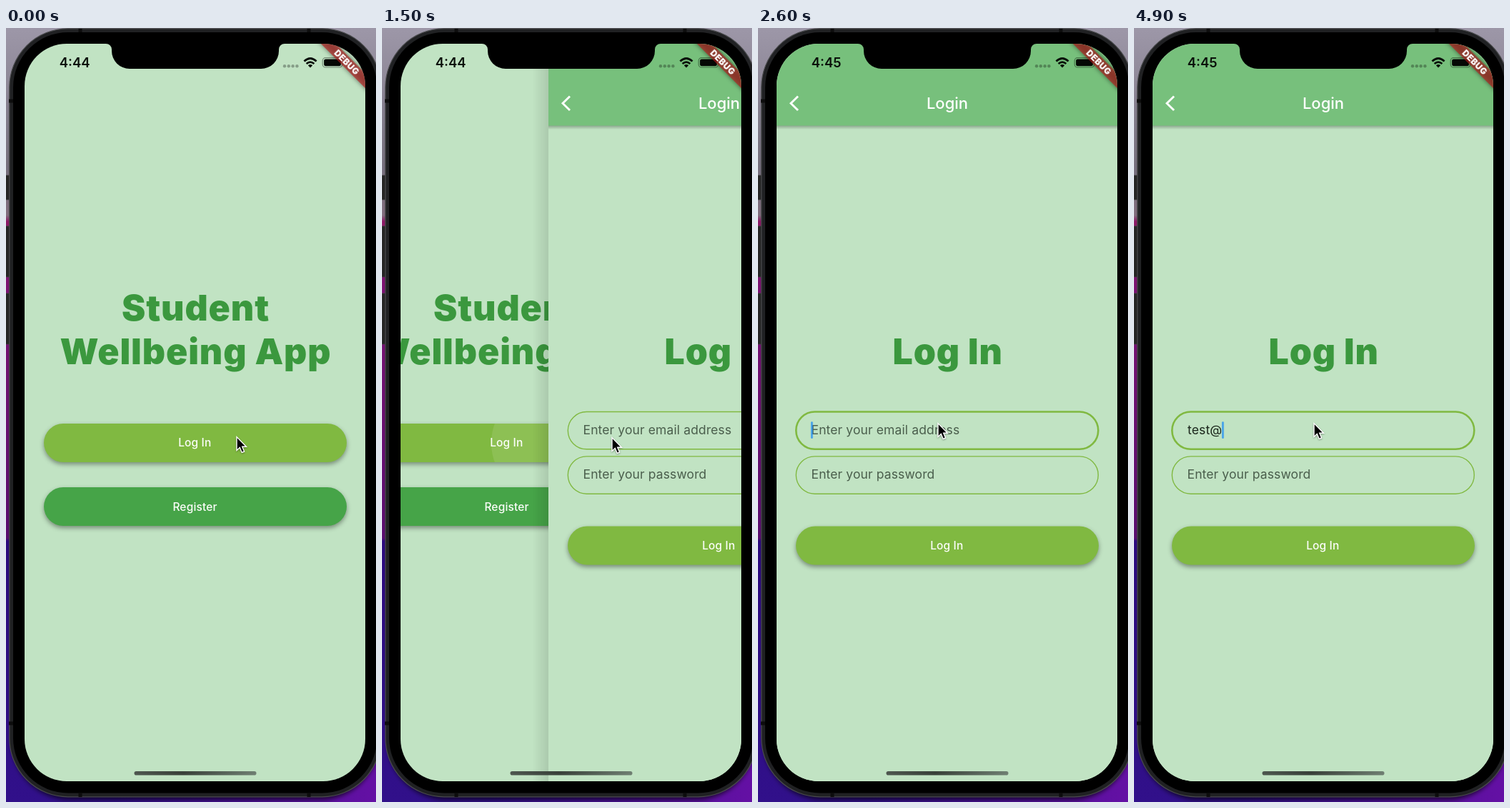
Write an HTML page that moves like this. It is 518 px wide and 1082 px high and loops after 5000 ms.

```html
<!DOCTYPE html>
<html lang="en">
<head>
<meta charset="utf-8">
<title>Login walkthrough</title>
<style>
html, body { margin: 0; height: 100%; overflow: hidden; background: #000; }
svg { display: block; width: 100vw; height: 100vh; }
text { font-family: Inter, "Open Sans", sans-serif; font-optical-sizing: none; }
.title { font-size: 50px; font-weight: 900; letter-spacing: .9px; fill: #3b983e; text-anchor: middle; }
.label { font-size: 15.5px; font-weight: 500; letter-spacing: .15px; fill: #fbfdf9; text-anchor: middle; }
.bar-title { font-size: 22px; font-weight: 500; fill: #fff; text-anchor: middle; }
.input { font-size: 17.5px; letter-spacing: .12px; fill: #1c281d; }
.hint { fill: #4a5e4c; }
.clock { font-size: 18.5px; font-weight: 600; fill: #0a100a; }
.debug { font-size: 12px; font-weight: 900; letter-spacing: .4px; fill: #fff; text-anchor: middle; }
.pill { filter: drop-shadow(0 3px 3px rgba(0, 0, 0, .38)); }
.field { fill: none; stroke: #80b941; stroke-width: 1.4; }

/* 2% of the loop is one 100 ms step */
.anim { animation: 5s step-end infinite; }
#home { animation-name: home; }
#login { animation-name: login; }
#splash { animation-name: splash; }
#before { animation-name: before; }
#after { animation-name: after; }
#pointer { animation-name: pointer; }
#focus { animation-name: focus; }
#hint { animation-name: hint; }
#caret { animation-name: caret, blink; }
#k1 { animation-name: k1; }
#k2 { animation-name: k2; }
#k3 { animation-name: k3; }
#k4 { animation-name: k4; }
#k5 { animation-name: k5; }

@keyframes home {
  0% { transform: translateX(0); }
  30% { transform: translateX(-90px); }
  32% { transform: translateX(-144px); }
  34% { transform: translateX(-155.5px); }
  36%, 100% { transform: translateX(-159px); }
}
@keyframes login {
  0% { transform: translateX(510px); }
  30% { transform: translateX(207px); }
  32% { transform: translateX(45px); }
  34% { transform: translateX(10px); }
  36%, 100% { transform: translateX(0); }
}
@keyframes splash { 0% { opacity: 0; } 30% { opacity: 1; } 36%, 100% { opacity: 0; } }
@keyframes before { 0% { opacity: 1; } 32%, 100% { opacity: 0; } }
@keyframes after { 0% { opacity: 0; } 32%, 100% { opacity: 1; } }
@keyframes pointer {
  0% { transform: translate(323px, 571px); }
  6% { transform: translate(322px, 572px); }
  32% { transform: translate(313px, 584px); }
  34% { transform: translate(297px, 601px); }
  36% { transform: translate(288px, 609px); }
  44% { transform: translate(284px, 601px); }
  46% { transform: translate(271px, 580px); }
  48% { transform: translate(257px, 558px); }
  50%, 100% { transform: translate(252px, 552px); }
}
@keyframes focus { 0% { stroke-width: 1.4px; } 50%, 100% { stroke-width: 2.6px; } }
@keyframes hint { 0% { opacity: 1; } 68%, 100% { opacity: 0; } }
@keyframes k1 { 0% { fill-opacity: 0; } 68%, 100% { fill-opacity: 1; } }
@keyframes k2 { 0% { fill-opacity: 0; } 70%, 100% { fill-opacity: 1; } }
@keyframes k3 { 0% { fill-opacity: 0; } 72%, 100% { fill-opacity: 1; } }
@keyframes k4 { 0% { fill-opacity: 0; } 74%, 100% { fill-opacity: 1; } }
@keyframes k5 { 0% { fill-opacity: 0; } 98%, 100% { fill-opacity: 1; } }
@keyframes caret {
  0% { transform: translateX(75.4px); }
  68% { transform: translateX(82px); }
  70% { transform: translateX(92px); }
  72% { transform: translateX(101.5px); }
  74% { transform: translateX(107.7px); }
  98%, 100% { transform: translateX(124.4px); }
}
@keyframes blink {
  0% { opacity: 0; }
  50% { opacity: 1; }
  60% { opacity: .7; }
  62% { opacity: .4; }
  64% { opacity: .15; }
  66% { opacity: 0; }
  68% { opacity: 1; }
  84% { opacity: .7; }
  86% { opacity: .4; }
  88% { opacity: .15; }
  90% { opacity: 0; }
  96%, 100% { opacity: 1; }
}
</style>
</head>
<body>
<svg viewBox="0 0 518 1082" preserveAspectRatio="none">
  <defs>
    <linearGradient id="desk" x2="0" y2="1">
      <stop offset="0" stop-color="#9d97a8"/>
      <stop offset=".18" stop-color="#77717f"/>
      <stop offset=".242" stop-color="#84707f"/>
      <stop offset=".25" stop-color="#8f1a68"/>
      <stop offset=".34" stop-color="#7c1274"/>
      <stop offset=".659" stop-color="#5b0d70"/>
      <stop offset=".663" stop-color="#2c0a80"/>
      <stop offset="1" stop-color="#31108a"/>
    </linearGradient>
    <linearGradient id="glow">
      <stop offset=".3" stop-color="#6410a4" stop-opacity="0"/>
      <stop offset="1" stop-color="#6410a4"/>
    </linearGradient>
    <linearGradient id="edge">
      <stop offset="0" stop-opacity="0"/>
      <stop offset="1" stop-opacity=".11"/>
    </linearGradient>
    <linearGradient id="fall" x2="0" y2="1">
      <stop offset="0" stop-opacity=".28"/>
      <stop offset="1" stop-opacity="0"/>
    </linearGradient>
    <linearGradient id="grip">
      <stop offset="0" stop-color="#4e574f"/>
      <stop offset=".4" stop-color="#394039"/>
      <stop offset="1" stop-color="#6f7f72"/>
    </linearGradient>
    <clipPath id="screen"><rect x="26" y="22" width="477" height="1031" rx="59"/></clipPath>
    <clipPath id="button"><rect x="53" y="553" width="424" height="54" rx="27"/></clipPath>
    <filter id="soft" x="-20%" y="-60%" width="140%" height="220%"><feGaussianBlur stdDeviation="3"/></filter>
  </defs>

  <!-- desktop and phone body -->
  <rect width="518" height="1082" fill="url(#desk)"/>
  <rect y="1000" width="518" height="82" fill="url(#glow)"/>
  <rect x="8" y="20" width="514" height="1059" rx="82" fill-opacity=".65" filter="url(#soft)"/>
  <g fill="#252525" stroke="#3c3c3c" stroke-width=".8">
    <rect x="-4" y="206" width="9" height="34"/>
    <rect x="-4" y="277" width="9" height="71"/>
    <rect x="-4" y="371" width="9" height="71"/>
  </g>
  <rect x="4.8" y=".8" width="520" height="1074" rx="82" fill="#202123" stroke="#4a4b4d" stroke-width="1.2"/>
  <rect x="10" y="6" width="509.5" height="1063.5" rx="77"/>
  <path d="M4 102h6M4 972h6M104 1v5M424 1v5M104 1069v6M424 1069v6" stroke="#0d0d0d" stroke-width="5"/>

  <g clip-path="url(#screen)">
    <rect x="26" y="22" width="478" height="1032" fill="#c1e3c3"/>

    <g id="home" class="anim">
      <text class="title" x="265.5" y="409">Student</text>
      <text class="title" x="265.5" y="470">Wellbeing App</text>
      <rect class="pill" x="53" y="553" width="424" height="54" rx="27" fill="#80b941"/>
      <g clip-path="url(#button)">
        <circle id="splash" class="anim" cx="322" cy="580" r="79" fill="#fff" fill-opacity=".1"/>
      </g>
      <text class="label" x="264.3" y="585.3">Log In</text>
      <rect class="pill" x="53" y="642" width="424" height="54" rx="27" fill="#46a448"/>
      <text class="label" x="264.5" y="674.5">Register</text>
    </g>

    <g id="login" class="anim">
      <rect x="4" y="22" width="22" height="1032" fill="url(#edge)"/>
      <rect x="26" y="22" width="478" height="1032" fill="#c1e3c3"/>
      <rect x="26" y="136" width="478" height="6" fill="url(#fall)"/>
      <rect x="26" y="22" width="478" height="114.5" fill="#77c07c"/>
      <path d="M56 95.5L46 105.3L56 115" fill="none" stroke="#fff" stroke-width="2.9"/>
      <text class="bar-title" x="265" y="113">Login</text>
      <text class="title" x="265.7" y="470">Log In</text>

      <rect id="focus" class="field anim" x="53.3" y="536.5" width="423" height="52.3" rx="26.1"/>
      <text id="hint" class="input hint anim" x="74.5" y="568">Enter your email address</text>
      <text class="input" x="75" y="568"><tspan id="k1" class="anim">t</tspan><tspan id="k2" class="anim">e</tspan><tspan id="k3" class="anim">s</tspan><tspan id="k4" class="anim">t</tspan><tspan id="k5" class="anim">@</tspan></text>
      <rect id="caret" class="anim" x="-1.2" y="550.3" width="2.4" height="23.6" rx="1.2" fill="#2f97f0"/>

      <rect class="field" x="53.3" y="598.9" width="423" height="52.3" rx="26.1"/>
      <text class="input hint" x="74.5" y="630.3">Enter your password</text>

      <rect class="pill" x="53" y="696.5" width="424" height="54" rx="27" fill="#80b941"/>
      <text class="label" x="264.3" y="728.5">Log In</text>
    </g>

    <!-- status bar -->
    <text id="before" class="clock anim" x="74.7" y="55.4">4:44</text>
    <text id="after" class="clock anim" x="74.7" y="55.4">4:45</text>
    <g fill-opacity=".3">
      <circle cx="390" cy="53.3" r="2.2"/><circle cx="395.8" cy="53.3" r="2.2"/>
      <circle cx="401.6" cy="53.3" r="2.2"/><circle cx="407.4" cy="53.3" r="2.2"/>
    </g>
    <g fill="none" stroke="#0a100a" stroke-width="2.7">
      <path d="M417.4 46.6Q426 38.4 434.6 46.6M420.6 50.1Q426 45 431.4 50.1"/>
    </g>
    <path d="M422.8 52.2Q426 49.6 429.2 52.2L426 55.6Z" fill="#0a100a"/>
    <rect x="443.2" y="41.6" width="27.6" height="13.4" rx="4.2" fill="none" stroke="#000" stroke-opacity=".4" stroke-width="1.2"/>
    <rect x="445.1" y="43.4" width="23.8" height="9.8" rx="2.6" fill="#050805"/>

    <!-- corner ribbon -->
    <g transform="translate(503 22) rotate(45)">
      <rect x="-52" y="29.2" width="104" height="14.8" fill-opacity=".5" filter="url(#soft)"/>
      <rect x="-52" y="29.2" width="104" height="14.8" fill="#b71c1c" fill-opacity=".63"/>
      <text class="debug" x="0" y="41">DEBUG</text>
    </g>

    <rect x="179.5" y="1039" width="171" height="5.6" rx="2.8" fill="url(#grip)"/>
  </g>

  <path d="M140 21V22A8 8 0 0 1 148 30V32A25 25 0 0 0 173 57H357A25 25 0 0 0 382 32V30A8 8 0 0 1 390 22V21Z"/>

  <g id="pointer" class="anim">
    <path d="M0 .6V19.4L4.3 15.5L7.2 22.4L10.6 21L7.7 14.2H13.4Z" stroke="#fff" stroke-width="1.4" style="filter: drop-shadow(0 1px 1px rgba(0,0,0,.35))"/>
  </g>
</svg>
</body>
</html>
```
